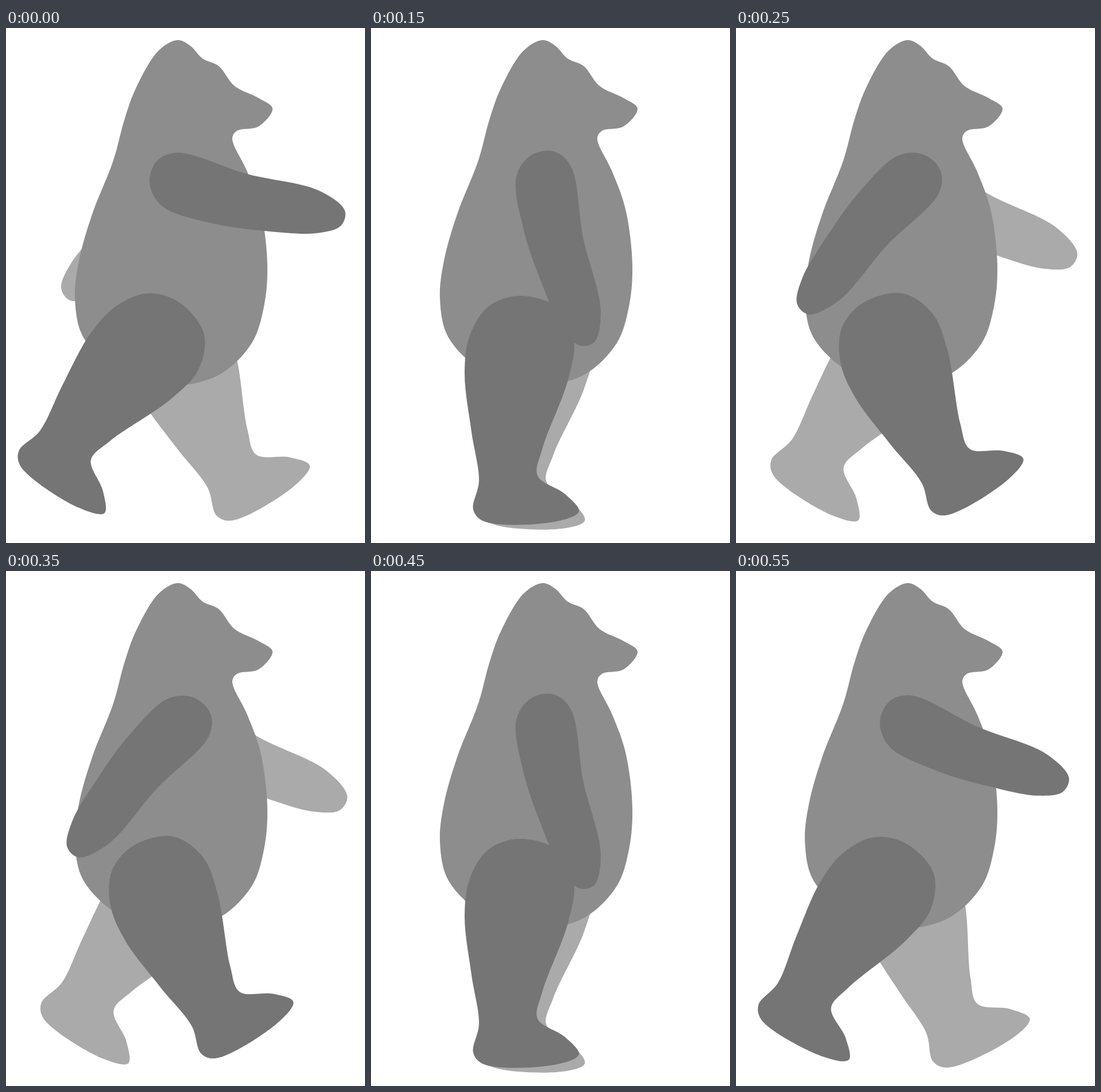
Recreate the animation shown at these times as an HTML page. Size 625 px wide and 896 px high, loop 0.6 s.

```html
<!DOCTYPE html>
<html lang="en">
<head>
<meta charset="utf-8">
<title>Walking bear</title>
<style>
  html, body { margin: 0; width: 100%; height: 100%; overflow: hidden; background: #fff; }
  svg { display: block; width: 100vw; height: 100vh; }
</style>
</head>
<body>
<svg viewBox="0 0 625 896">
  <g fill="#aaaaaa">
    <path id="farArm"/>
    <path id="farLeg"/>
  </g>
  <path id="body" fill="#8d8d8d"/>
  <g fill="#757575">
    <path id="nearArm"/>
    <path id="nearLeg"/>
  </g>
</svg>
<script>
const STEP = 50, STEPS = 12;

// Key points of each outline; smooth() rounds them into a closed curve.
const back = "299,21 266,39 226,105 206,160 187,230 150,324 127,405 120,470 133,535 185,591";
const belly = "246,620 312,621 375,601 428,548 449,485 455,412 443,315 420,250";
const face = "394,192 402,179 440,171 464,140 440,122 398,101 370,66 342,53 321,31";
const arm = "298,217 262,232 250,270 272,310 360,340 450,353 540,357 583,344 590,318 545,283 420,254";
const thigh = "298,733 343,612 353,543 325,486 257,466 204,485 172,535 163,600 175,703";
const foot = "188,788 178,838 196,858 320,859 362,841 338,811 290,779";

// Closed centripetal Catmull-Rom spline written as cubic segments.
function smooth(...parts) {
  const pts = parts.join(" ").split(" ").map(p => p.split(",").map(Number));
  const at = i => pts[(i + pts.length) % pts.length];
  const knot = (a, b) => Math.sqrt(Math.hypot(b[0] - a[0], b[1] - a[1]));
  const handle = (i, side) => {
    const a = at(i - 1), p = at(i), b = at(i + 1);
    const h0 = knot(a, p), h1 = knot(p, b);
    const reach = side * (side > 0 ? h1 : h0) / 3;
    return p.map((v, k) => {
      const before = (v - a[k]) / h0, after = (b[k] - v) / h1;
      return v + reach * (h0 * after + h1 * before) / (h0 + h1);
    });
  };
  const segments = pts.map((p, i) => "C" + [handle(i, 1), handle(i + 1, -1), at(i + 1)].join(" "));
  return "M" + pts[0] + segments.join("") + "Z";
}

const byId = id => document.getElementById(id);

// A limb swings by mid + amp * cos(phase) degrees about its joint.
function limb(id, outline, joint, shift, mid, amp) {
  const node = byId(id);
  node.setAttribute("d", outline);
  return swing => node.setAttribute("transform",
    `translate(${shift}) rotate(${mid + amp * swing} ${joint})`);
}

byId("body").setAttribute("d", smooth(back, belly, face));
const armPath = smooth(arm), legPath = smooth(thigh, foot);
const limbs = [
  limb("farArm", armPath, [304, 269], [23, 10], 66.5, 61.5),
  limb("farLeg", legPath, [259, 542], [34, 8.5], 4.5, -33.7),
  limb("nearArm", armPath, [304, 269], [0, 0], 63.3, -63.3),
  limb("nearLeg", legPath, [262, 540], [0, 0], 0, 35)
];

function draw(ms) {
  const step = Math.floor(ms / STEP) % STEPS;
  const swing = Math.cos(2 * Math.PI * step / STEPS);
  limbs.forEach(pose => pose(swing));
}

const start = performance.now();
function tick() {
  draw(performance.now() - start);
  requestAnimationFrame(tick);
}
tick();
</script>
</body>
</html>
```
